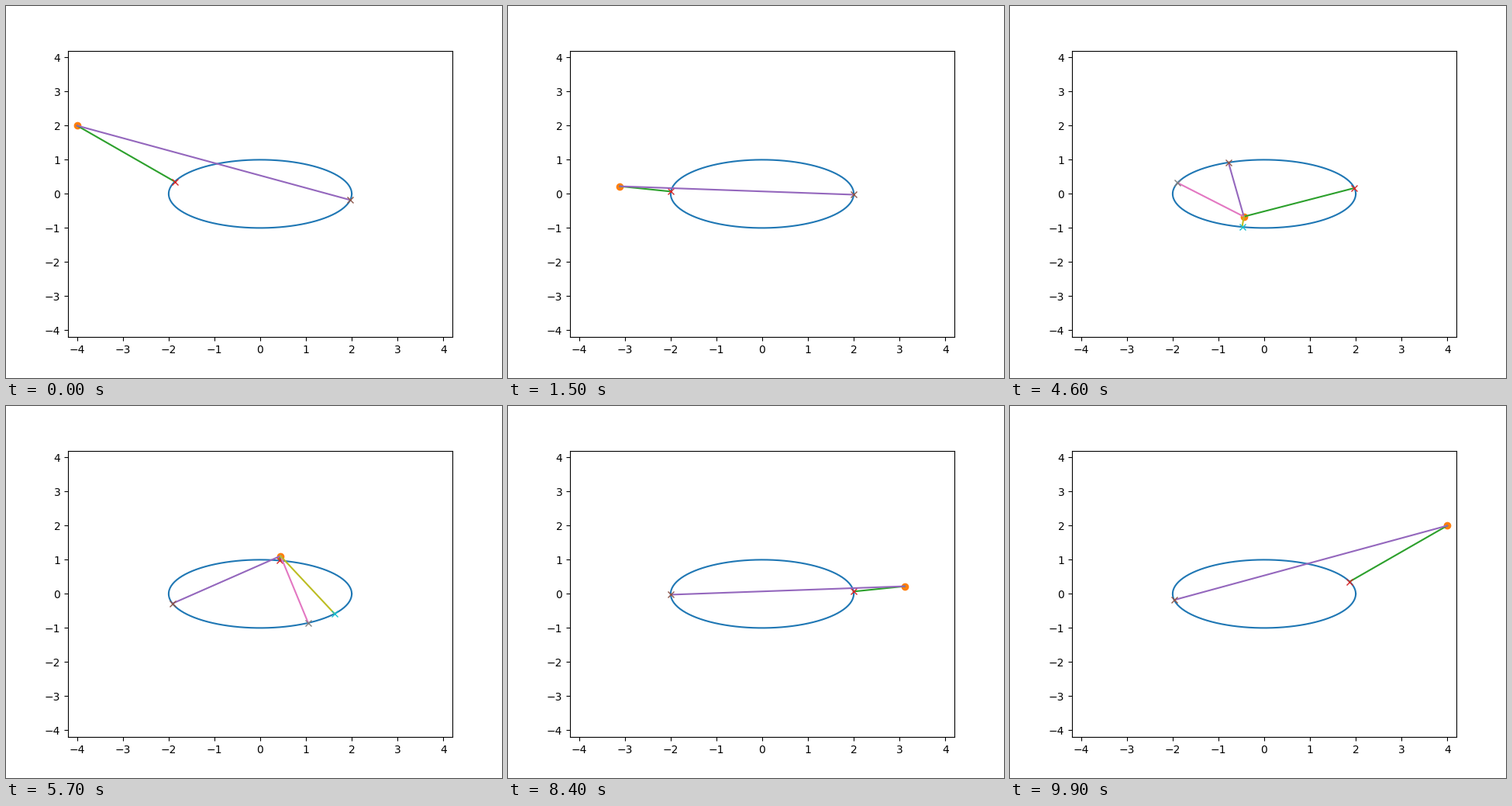
Recreate the animation shown at these times as a matplotlib script. Size 640 by 480 pixels, loop 10 s.

```python
import numpy as np
import matplotlib.pyplot as plt
from matplotlib.animation import FuncAnimation

A, B = 2, 1          # ellipse semi-axes
N = 10               # grid points per side
LIMIT = 4.2

xs = np.linspace(-4, 4, N)
ys = np.linspace(2, -2, N)
ts = np.linspace(0, 2 * np.pi, 4001)


def ellipse(t):
    return A * np.cos(t), B * np.sin(t)


def grid_point(i):
    """Walk the grid column by column, alternating down and up."""
    col, row = divmod(i, N)
    return xs[col], ys[N - 1 - row if col % 2 else row]


def normal_feet(x, y):
    """Parameters of the ellipse points whose normal passes through (x, y)."""
    f = (B * y * np.cos(ts) - A * x * np.sin(ts)
         + (A**2 - B**2) * np.sin(ts) * np.cos(ts))
    k = np.flatnonzero(f[:-1] * f[1:] < 0)
    return ts[k] + (ts[k + 1] - ts[k]) * f[k] / (f[k] - f[k + 1])


fig, ax = plt.subplots(figsize=(6.4, 4.8), dpi=100)
ax.set(xlim=(-LIMIT, LIMIT), ylim=(-LIMIT, LIMIT))
ax.plot(*ellipse(np.linspace(0, 2 * np.pi, 200)), color="C0")
dot, = ax.plot([], [], "o", color="C1")
normals = []
for n in range(4):
    line, = ax.plot([], [], color=f"C{2 * n + 2}")
    cross, = ax.plot([], [], "x", color=f"C{2 * n + 3}")
    normals.append((line, cross))


def update(i):
    x, y = grid_point(i)
    dot.set_data([x], [y])
    feet = normal_feet(x, y)
    for n, (line, cross) in enumerate(normals):
        if n < len(feet):
            fx, fy = ellipse(feet[n])
            line.set_data([x, fx], [y, fy])
            cross.set_data([fx], [fy])
        else:
            line.set_data([], [])
            cross.set_data([], [])


anim = FuncAnimation(fig, update, frames=N * N, interval=100,
                     repeat=True, repeat_delay=0)
plt.show()
```
